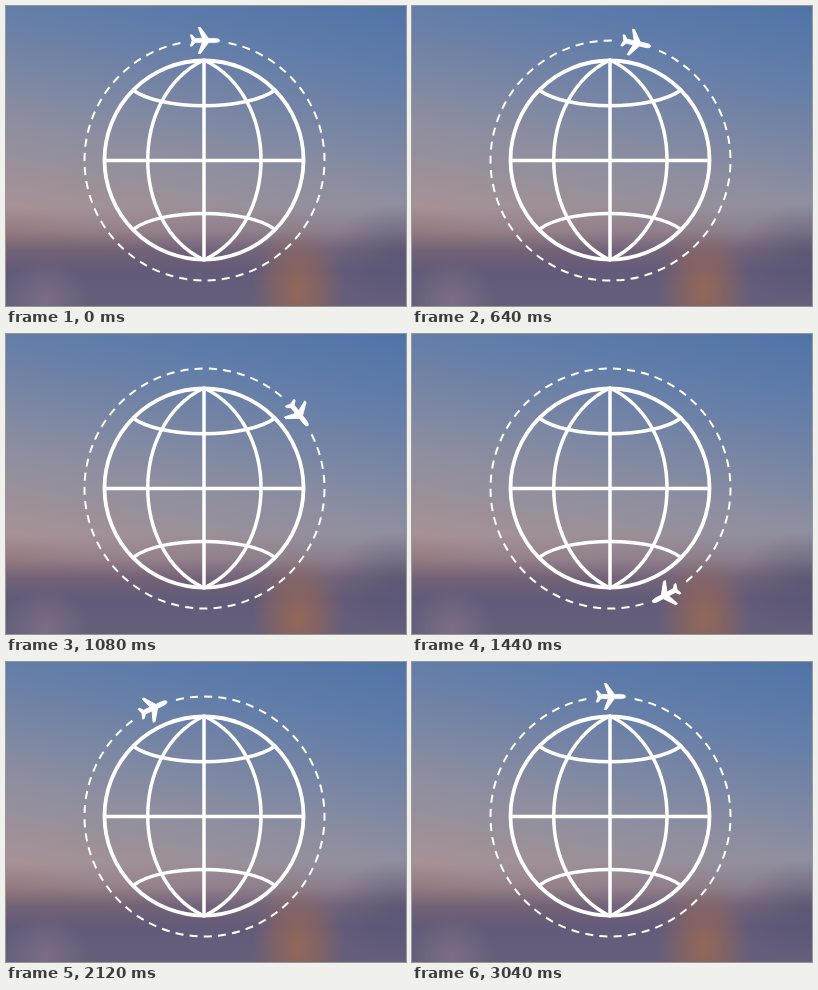
An HTML page for the animation above (3080 ms loop, 400 by 300 pixels).

```html
<!DOCTYPE html>
<html lang="en">
<head>
<meta charset="utf-8">
<title>Plane around the globe</title>
<style>
  html, body { margin: 0; width: 100%; height: 100%; overflow: hidden; }
  body {
    background:
      radial-gradient(ellipse 46px 64px at 292px 284px, rgba(160, 106, 80, .8), rgba(160, 106, 80, .45) 50%, rgba(160, 106, 80, 0)),
      radial-gradient(ellipse 42px 40px at 40px 294px, rgba(142, 122, 142, .55), rgba(142, 122, 142, 0)),
      radial-gradient(ellipse 70px 50px at 395px 248px, rgba(82, 82, 116, .6), rgba(82, 82, 116, 0)),
      linear-gradient(rgba(104, 88, 112, 0) 200px, rgba(104, 88, 112, .3) 225px,
        rgba(102, 88, 114, .8) 244px, #635b79 264px, #655f7c 300px),
      linear-gradient(191deg, #5073a6, #5a79a9 40px, #637ea9 76px, #6f82a6 110px, #7e88a3 150px,
        #888ca1 175px, #908f9f 200px, #9b9099 235px, #a79297 272px, #a88a86 300px);
  }
  svg { display: block; width: 100%; height: 100%; }
</style>
</head>
<body>
<svg viewBox="0 0 400 300" fill="none" stroke="#fff">
  <g stroke-width="3.5">
    <circle cx="198" cy="154" r="99.5" stroke-width="3.8"/>
    <path d="M198 54V254M98 154.5H298"/>
    <path d="M198 54C123 90 123 218 198 254C274 218 274 90 198 54Z" stroke-linejoin="round"/>
    <path d="M127 84C155 105 241 105 269 84M127 223.5C155 202 241 202 269 223.5"/>
  </g>
  <g id="orbit">
    <path id="ring" stroke-width="2"/>
    <path transform="translate(198.5 34.5)" fill="#fff" stroke-width=".8" stroke-linejoin="round"
      d="M15.2 0C15.2 -1.4 12.5 -2.1 10 -2.1H4L-4 -13H-6.2L-2.2 -2.1H-9.5L-12.4 -5.6H-14.2L-12.4 0
         L-14.2 5.6H-12.4L-9.5 2.1H-2.2L-6.2 13H-4L4 2.1H10C12.5 2.1 15.2 1.4 15.2 0Z"/>
  </g>
</svg>
<script>
  const LOOP = 3080, STEP = 40;
  const CX = 198.5, CY = 154.5, R = 120;
  const GAP = 11.6, DASHES = 50, FILL = 0.57;

  // time in ms, angle in degrees, speed in degrees per ms
  const KEYS = [
    [0, 0, 0], [640, 12.2, .046], [1080, 51.5, .15], [1440, 152.5, .43],
    [1680, 260, .34], [1800, 290.3, .2], [2240, 343.4, .06], [2440, 351.6, .028], [3040, 360, 0]
  ];

  function angleAt(t) {
    const i = KEYS.findIndex(k => k[0] > t);
    if (i < 0) return 360;
    const [t0, a0, v0] = KEYS[i - 1], [t1, a1, v1] = KEYS[i];
    const h = t1 - t0, u = (t - t0) / h, w = 1 - u;
    return w * w * (1 + 2 * u) * a0 + u * u * (3 - 2 * u) * a1
      + h * u * w * (w * v0 - u * v1);
  }

  function point(deg) {
    const a = deg * Math.PI / 180;
    return (CX + R * Math.sin(a)).toFixed(2) + ' ' + (CY - R * Math.cos(a)).toFixed(2);
  }

  const pitch = (360 - 2 * GAP) / (DASHES - 1 + FILL);
  let dashes = '';
  for (let i = 0; i < DASHES; i++) {
    const a = GAP + i * pitch;
    dashes += `M${point(a)}A${R} ${R} 0 0 1 ${point(a + pitch * FILL)}`;
  }
  document.getElementById('ring').setAttribute('d', dashes);

  const orbit = document.getElementById('orbit');
  const start = performance.now();

  function draw(now) {
    const t = Math.max(0, now - start) % LOOP;
    const angle = angleAt(Math.floor(t / STEP) * STEP);
    orbit.setAttribute('transform', `rotate(${angle.toFixed(3)} ${CX} ${CY})`);
    requestAnimationFrame(draw);
  }
  draw(start);
</script>
</body>
</html>
```
